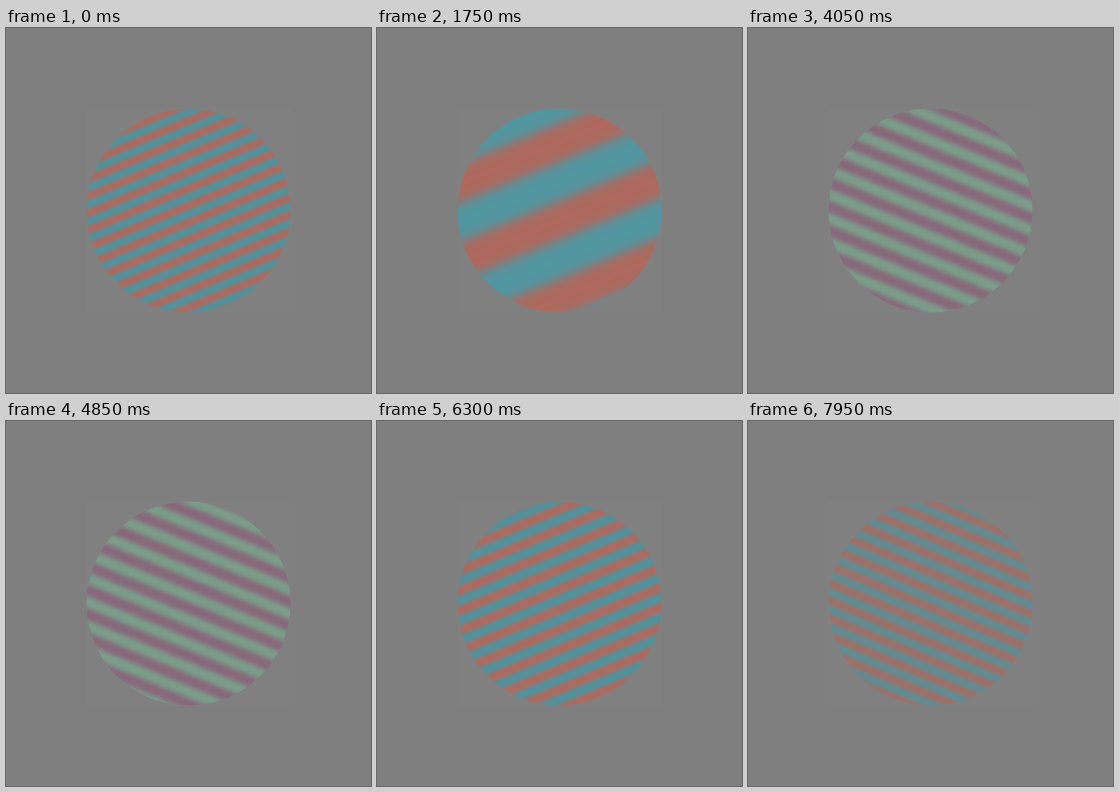
Recreate the animation shown at these times as an HTML page with a canvas. Size 365 by 365 pixels, loop 8 s.

```html
<!DOCTYPE html>
<html lang="en">
<head>
<meta charset="utf-8">
<title>Drifting gratings</title>
<style>
html, body { margin: 0; width: 100%; height: 100%; overflow: hidden; background: #7f7f7f; }
canvas { display: block; width: 365px; height: 365px; }
</style>
</head>
<body>
<canvas id="stage" width="365" height="365"></canvas>
<script>
const ctx = document.getElementById("stage").getContext("2d");
const LOOP = 8000, STEP = 50, CENTER = 182.5, RADIUS = 102, CYCLES_PER_SECOND = 2;

// offset: distance of a cool stripe from the centre at time "at"
const gratings = [
  { start: 0,    at: 0,    angle: 67.5,  period: 15.7, offset: 3.2,  warm: [172, 107, 96], cool: [82, 145, 155],  edge: 1.8 },
  { start: 1000, at: 1750, angle: 67.5,  period: 72,   offset: -27,  warm: [175, 105, 94], cool: [80, 149, 160],  edge: 1.8 },
  { start: 2000, at: 2800, angle: 22.5,  period: 21.7, offset: -4.6, warm: [203, 94, 75],  cool: [48, 163, 181],  edge: 1.8 },
  { start: 3400, at: 4050, angle: 112.5, period: 22.2, offset: 1.8,  warm: [136, 104, 123], cool: [122, 157, 137], edge: 0.8 },
  { start: 5000, at: 5650, angle: -22.5, period: 15.2, offset: -4,   warm: [135, 88, 116], cool: [122, 167, 137], edge: 0.8 },
  { start: 6000, at: 6950, angle: 67.5,  period: 18.5, offset: 1.5,  warm: [172, 107, 96], cool: [82, 145, 155],  edge: 1.8 },
  { start: 7000, at: 7950, angle: 112.5, period: 16.2, offset: -4.6, warm: [157, 113, 105], cool: [98, 139, 145],  edge: 1.8 }
];

function stripes(g, time) {
  const fill = ctx.createLinearGradient(-RADIUS, 0, RADIUS, 0);
  const phase = g.offset / g.period + (time - g.at) / 1000 * CYCLES_PER_SECOND;
  for (let x = -RADIUS; x <= RADIUS; x++) {
    const wave = Math.cos(2 * Math.PI * (x / g.period - phase));
    const mix = 0.5 + 0.5 * Math.tanh(g.edge * wave) / Math.tanh(g.edge);
    const color = g.warm.map((w, i) => Math.round(w + (g.cool[i] - w) * mix));
    fill.addColorStop((x + RADIUS) / (2 * RADIUS), `rgb(${color})`);
  }
  return fill;
}

function draw(time) {
  const g = gratings.findLast(item => item.start <= time);
  ctx.fillStyle = "#7f7f7f";
  ctx.fillRect(0, 0, 365, 365);
  ctx.fillStyle = "#808080";
  ctx.fillRect(80, 80, 205, 205);
  ctx.save();
  ctx.translate(CENTER, CENTER);
  ctx.rotate(g.angle * Math.PI / 180);
  ctx.fillStyle = stripes(g, time);
  ctx.beginPath();
  ctx.arc(0, 0, RADIUS, 0, 2 * Math.PI);
  ctx.fill();
  ctx.restore();
}

const began = performance.now();
function tick() {
  const elapsed = (performance.now() - began) % LOOP;
  draw(Math.floor(elapsed / STEP) * STEP);
  requestAnimationFrame(tick);
}
tick();
</script>
</body>
</html>
```
